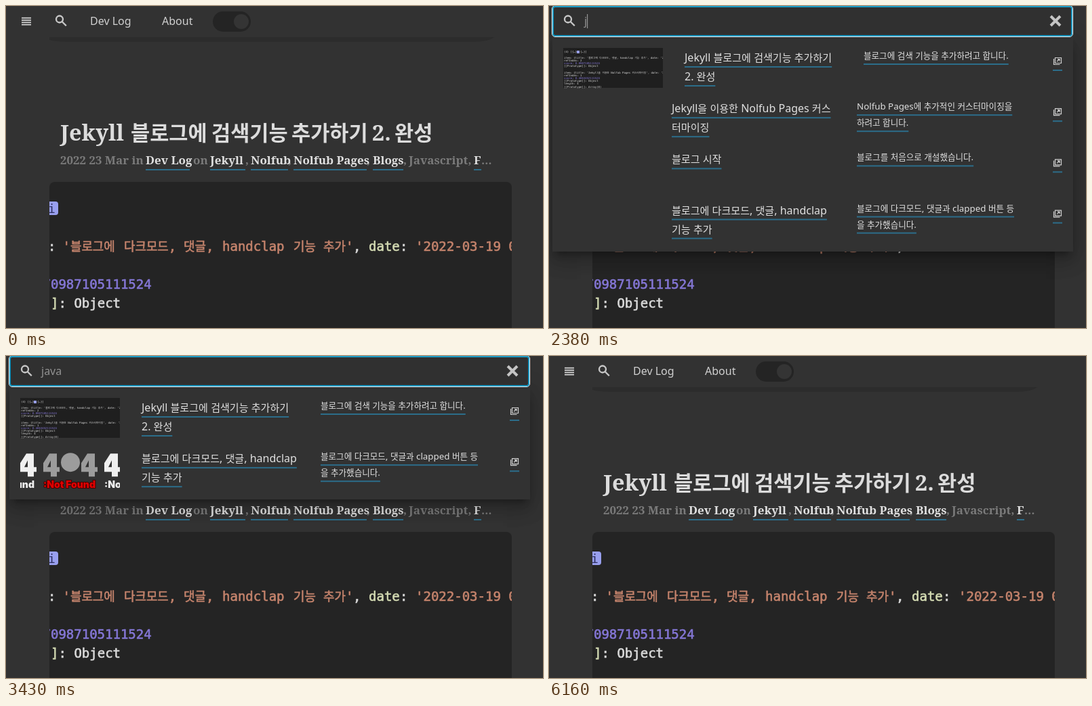
These frames come from a looping animation (792x476 px, 6.37 s). An HTML page:

```html
<!DOCTYPE html>
<html lang="ko">
<head>
<meta charset="utf-8">
<title>Blog search</title>
<style>
  html, body { margin: 0; width: 100%; height: 100%; overflow: hidden; background: #323232; }
  svg, #overlay, #panel { position: absolute; left: 0; top: 0; }
  svg { width: 792px; height: 476px; }
  text { white-space: pre; font-family: "Noto Sans", "Noto Sans CJK KR", sans-serif; }
  .ko { font-family: "Noto Sans CJK KR", "Noto Sans CJK", sans-serif; font-size: .942em; }
  .slab { font-family: "Roboto Slab", "Noto Serif", serif; font-weight: 700; }
  .mono { font-family: "DejaVu Sans Mono", monospace; }
  .black { font-family: Inter, sans-serif; font-weight: 900; }
  #panel {
    left: 5px; top: 45px; width: 768px; background: #323232;
    box-shadow: 0 16px 24px 2px rgba(0,0,0,.14), 0 6px 30px 5px rgba(0,0,0,.12), 0 8px 10px -5px rgba(0,0,0,.3);
  }
</style>
</head>
<body>
<svg id="page">
  <defs>
    <clipPath id="cardClip"><rect x="64" y="260" width="682" height="230" rx="8"/></clipPath>
    <clipPath id="thumbClip"><rect width="147" height="60"/></clipPath>
  </defs>
</svg>
<div id="overlay">
  <div id="panel"></div>
  <svg id="front"></svg>
</div>
<script>
const LOOP = 6370;
const LINK = '#2c6d8a';
const $ = id => document.getElementById(id);

function add(parent, tag, attrs = {}) {
  const node = document.createElementNS('http://www.w3.org/2000/svg', tag);
  for (const key in attrs) node.setAttribute(key, attrs[key]);
  return parent.appendChild(node);
}

// Hangul runs get their own font and a slightly smaller size.
function setText(node, str) {
  node.textContent = '';
  str.split(/([가-힣ㄱ-ㅣ]+)/).forEach((part, i) => {
    if (part) add(node, 'tspan', i % 2 ? { class: 'ko' } : {}).textContent = part;
  });
}

function label(parent, x, y, str, size, fill, cls = '') {
  const node = add(parent, 'text', { x, y, fill, class: cls, style: `font-size:${size}px` });
  setText(node, str);
  return node;
}

const underline = (parent, x, y, width) =>
  add(parent, 'rect', { x, y, width, height: 2, fill: LINK });

function link(parent, x, y, str, size) {
  const node = label(parent, x, y, str, size, '#e0e0e0');
  underline(parent, x, y + 7, node.getComputedTextLength());
}

function magnifier(parent, x) {
  return add(parent, 'path', {
    d: `M${x + 11} 19.5a5 5 0 1 1 -10 0a5 5 0 1 1 10 0M${x + 9.8} 23.3l6 6`,
    fill: 'none', stroke: '#c8c8c8', 'stroke-width': 2.3
  });
}

// Page
const page = $('page');
add(page, 'path', { d: 'M64 46H721Q710 53 690 53H96Q72 53 64 50z', fill: '#2c2c2c' });
for (let i = 0; i < 4; i++)
  add(page, 'rect', { x: 23, y: 16.8 + i * 3.3, width: 14, height: 1.8, fill: '#d0d0d0' });
const navSearch = magnifier(page, 73);
label(page, 124, 28, 'Dev Log', 16, '#d0d0d0');
label(page, 230, 28, 'About', 16, '#d0d0d0');
add(page, 'rect', { x: 305, y: 8, width: 56, height: 30, rx: 15, fill: '#242424' });
add(page, 'circle', { cx: 347, cy: 23, r: 11, fill: '#343434' });

[[80, 'Jekyll'], [184, '블로그에'], [303, '검색기능'], [421, '추가하기'], [540, '2.'], [573, '완성']]
  .forEach(([x, word]) => label(page, x, 199, word, 32.5, '#dcdcdc', 'slab'));

[[80, '2022 23 Mar in'], [276, 'on'], [353, ','], [416, ','], [532, ','], [586, ','], [594, 'Javascript,'], [701, '…']]
  .forEach(([x, word]) => label(page, x, 234, word, 17, '#7a7a7a', 'slab'));
[[206, 65, 'Dev Log'], [301, 52, 'Jekyll'], [361, 55, 'Nolfub'], [424, 108, 'Nolfub Pages'], [541, 45, 'Blogs'], [690, 11, 'F']]
  .forEach(([x, width, word]) => {
    label(page, x, 234, word, 17, '#e0e0e0', 'slab');
    underline(page, x, 241, width);
  });

const card = add(page, 'g', { 'clip-path': 'url(#cardClip)' });
add(card, 'rect', { x: 64, y: 260, width: 682, height: 216, fill: '#242424' });
const code = add(card, 'g', { style: 'filter:blur(.45px)', 'stroke-width': .6 });
add(code, 'rect', { x: 50, y: 289, width: 27, height: 20, rx: 4, fill: '#989fee' });
label(code, 62, 306, 'i', 18, '#2c2f60', 'mono');
const STRING = '#c4836c', PALE = '#dadada', KEY = '#d3dab2';
[
  [62, 362, ':', PALE], [83.5, 362, "'블로그에", STRING], [174, 362, '다크모드,', STRING],
  [262, 362, '댓글,', STRING], [319, 362, 'handclap', STRING], [424, 362, '기능', STRING],
  [468, 362, "추가'", STRING], [512, 362, ',', PALE], [535, 362, 'date', KEY], [581, 362, ':', PALE],
  [604, 362, "'2022-03-19 00", STRING], [54.5, 418, '70987105111524', '#8577d6'],
  [66, 446, ']', KEY], [77.5, 446, ': Object', PALE]
].forEach(([x, y, str, fill]) => label(code, x, y, str, 19, fill, 'mono').setAttribute('stroke', fill));

// Result thumbnails
function codeThumb(parent) {
  add(parent, 'rect', { width: 147, height: 59, fill: '#1f1f1f' });
  const item = title => `item: {title: '${title}', date: '2022-03-19 00:00:00 +0900'`;
  [
    [7, '(4) [{…}, {…}]', PALE], [16, item('블로그에 다크모드, 댓글, handclap 기능 추가'), PALE],
    [20, 'refIndex: 2', PALE], [24, 'score: 0.0987105111524', '#8577d6'], [28, '[[Prototype]]: Object', PALE],
    [38, item('Jekyll을 이용한 Nolfub Pages 커스터마이징'), PALE], [42, 'refIndex: 1', PALE],
    [46, 'score: 0.4063452111524', '#8577d6'], [50, '[[Prototype]]: Object', PALE],
    [54, 'length: 4', PALE], [58.5, '[[Prototype]]: Array(0)', PALE]
  ].forEach(([y, str, fill]) => label(parent, 1, y, str, 4, fill, 'mono'));
  add(parent, 'rect', { x: 20, y: 4, width: 4, height: 4, fill: '#989fee' });
}

function missingThumb(parent) {
  [-56, 34, 124].forEach((x, i) => {
    const middle = i === 1;
    const fill = middle ? '#9c9c9c' : '#efefef';
    for (const dx of [0, 56])
      add(parent, 'path', {
        d: `M${x + dx} 21L${x + dx + 9} 7h11v20h4v7h-4v7h-9v-7h-11zM${x + dx + 11} 17l-5 10h5z`,
        fill, 'fill-rule': 'evenodd'
      });
    add(parent, 'circle', { cx: x + 40, cy: 20, r: 14, fill });
    const words = label(parent, x, 58, ':Not Found', 14, middle ? '#e00000' : '#efefef', 'black');
    if (middle) words.setAttribute('style', 'font-size:14px;paint-order:stroke;stroke:#4a0000;stroke-width:2px');
  });
}

// Results
const posts = {
  search: { title: ['Jekyll 블로그에 검색기능 추가하기', '2. 완성'], note: ['블로그에 검색 기능을 추가하려고 합니다.'] },
  custom: {
    title: ['Jekyll을 이용한 Nolfub Pages 커', '스터마이징'],
    wide: ['Jekyll을 이용한 Nolfub Pages 커스', '터마이징'],
    note: ['Nolfub Pages에 추가적인 커스터마이징을', '하려고 합니다.']
  },
  dark: { title: ['블로그에 다크모드, 댓글, handclap', '기능 추가'], note: ['블로그에 다크모드, 댓글과 clapped 버튼 등', '을 추가했습니다.'] },
  start: { title: ['블로그 시작'], note: ['블로그를 처음으로 개설했습니다.'] }
};

function drawRow(list, name, row, loaded) {
  const post = posts[name], first = name === 'search';
  const hasThumb = loaded || first;
  const g = add(list, 'g', { transform: `translate(0 ${62 + row * 75.2})` });
  if (hasThumb) {
    const thumb = add(add(g, 'g', { transform: 'translate(21 0)' }), 'g', { 'clip-path': 'url(#thumbClip)' });
    (first ? codeThumb : missingThumb)(thumb);
  }
  const title = !hasThumb && post.wide || post.title;
  title.forEach((line, i) => link(g, hasThumb ? 200 : 181, 20 + i * 28, line, 16));
  post.note.forEach((line, i) => link(g, hasThumb ? 464 : 454, 16 + i * 24, line, 13.33));
  add(g, 'path', {
    d: 'M746.5 14.5h9v8h-9zM744.5 16v8.5h9M749 20l4-3.5M750 16.5h3v3',
    fill: 'none', stroke: '#d0d0d0', 'stroke-width': 1.2
  });
  underline(g, 743, 32, 14);
}

const front = $('front');
function makeList(names, loaded = true) {
  const g = add(front, 'g');
  names.forEach((name, row) => drawRow(g, name, row, loaded));
  return { g, height: names.length > 2 ? 318 : 167 };
}
const byDate = ['search', 'custom', 'start', 'dark'];
const lists = {
  loading: makeList(byDate, false),
  j: makeList(byDate),
  ja: makeList(['search', 'custom', 'dark', 'start']),
  java: makeList(['search', 'dark'])
};

// Search field
add(front, 'rect', { x: 4.5, y: -.5, width: 768, height: 46, rx: 4.5, fill: '#303030', stroke: '#f0f8fa' });
add(front, 'rect', { x: 6, y: 1, width: 765, height: 43, rx: 3, fill: 'none', stroke: '#1b9ac4', 'stroke-width': 2 });
magnifier(front, 22);
const close = add(front, 'path', { d: 'M740 15l14 14M754 15l-14 14', stroke: '#c4c4c4', 'stroke-width': 4 });
const field = label(front, 52, 28, '', 16, '#777');
const caret = add(front, 'rect', { y: 12, width: 1, height: 21, fill: '#a8a8a8' });

// time, opacity of the search layer, typed text, caret, list
const steps = [
  [0, 0, '', 0], [560, .35, '', 1], [630, .75, '', 1], [700, 1, '', 1],
  [1050, 1, '', 0], [1400, 1, 'ㅓ', 1], [1890, 1, 'ㅓ', 0], [2030, 1, '', 1],
  [2380, 1, 'j', 1, 'loading'], [2450, 1, 'j', 1, 'j'], [2520, 1, 'ja', 1, 'ja'],
  [2730, 1, 'jav', 1, 'java'], [2940, 1, 'java', 1, 'java'], [3430, 1, 'java', 0, 'java'],
  [3920, 1, 'java', 1, 'java'], [4410, 1, 'java', 0, 'java'], [4970, 1, 'java', 1, 'java'],
  [5390, .65, 'java', 0, 'java'], [5460, .25, 'java', 0, 'java'], [5530, 0, '', 0]
];

let shown;
function show(step) {
  const [, opacity, typed, caretOn, listName] = step;
  $('overlay').style.opacity = opacity;
  setText(field, typed || 'Type something...');
  field.setAttribute('fill', typed ? '#929292' : '#777');
  caret.setAttribute('x', typed ? 52 + field.getComputedTextLength() : 52);
  caret.style.visibility = caretOn ? 'visible' : 'hidden';
  for (const name in lists)
    lists[name].g.style.visibility = name === listName ? 'visible' : 'hidden';
  $('panel').style.visibility = listName ? 'visible' : 'hidden';
  if (listName) $('panel').style.height = lists[listName].height + 'px';
}

function frame() {
  const t = performance.now() % LOOP;
  const step = steps.filter(s => s[0] <= t).pop();
  if (step !== shown) show(shown = step);
  navSearch.setAttribute('stroke', t >= 210 && t < 5390 ? '#999' : '#c8c8c8');
  const dim = Math.min(1, Math.max(0, (t - 4200) / 210));
  close.setAttribute('opacity', 1 - .32 * dim);
  requestAnimationFrame(frame);
}
frame();
</script>
</body>
</html>
```
